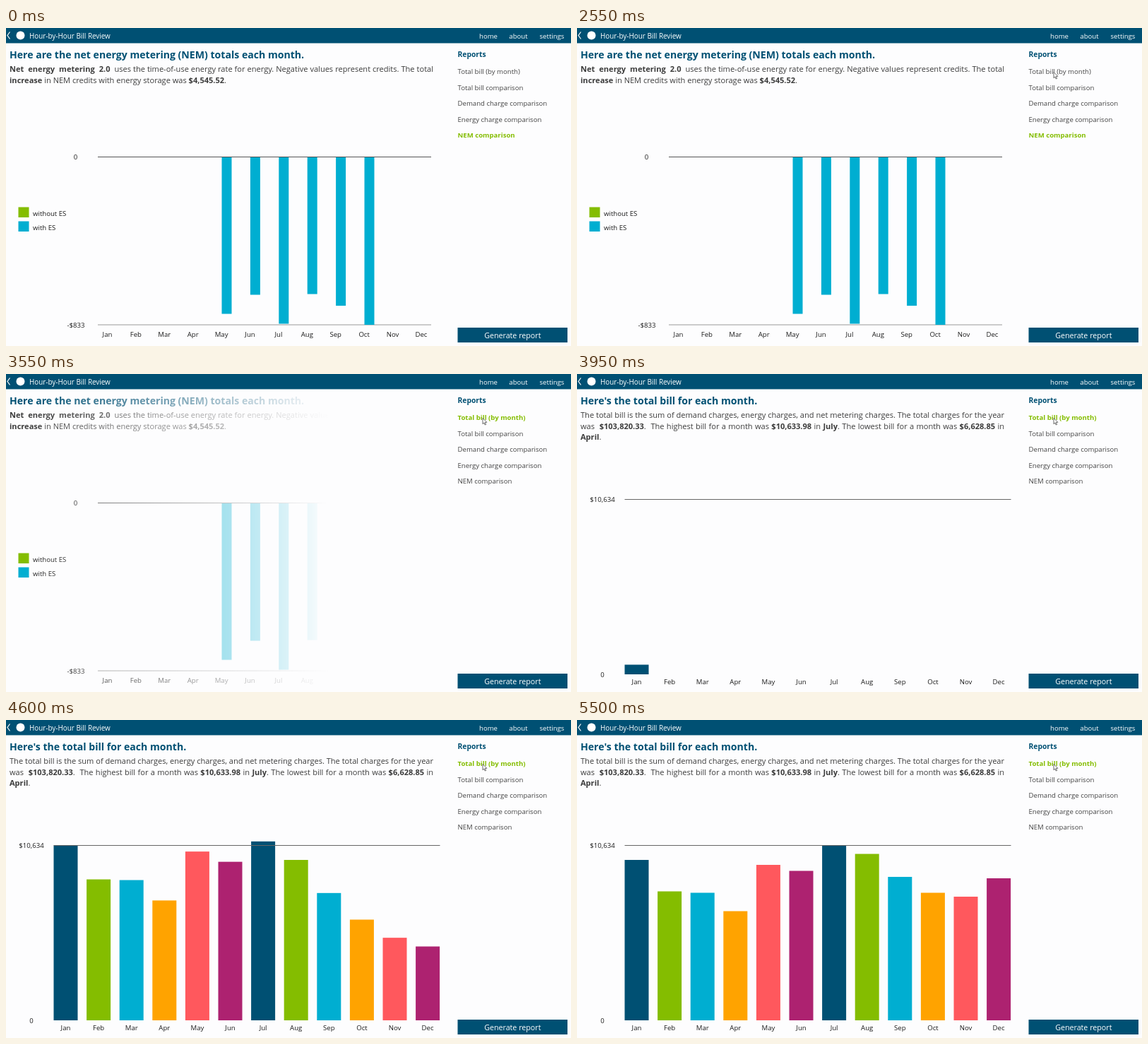
Animation of 800 by 450 pixels, one loop 8000 ms. Source, as an HTML page:

```html
<!DOCTYPE html>
<html lang="en">
<head>
<meta charset="utf-8">
<title>Monthly bill report</title>
<style>
  html, body { margin: 0; width: 100%; height: 100%; overflow: hidden; background: #fdfdfe; }
  #stage { position: relative; width: 800px; height: 450px; overflow: hidden; }
  #stage section, svg { position: absolute; left: 0; top: 0; width: 800px; height: 450px; }
  text { font: 500 9.6px "Open Sans", sans-serif; fill: #1c1c1c; }
  .heading { font-size: 14.1px; font-weight: 700; fill: #005073; }
  .mid { text-anchor: middle; }
  .light { fill: #fff; }
  .item { fill: #444; }
  .item.on { fill: #84bd00; font-weight: 700; }
  p { position: absolute; left: 5px; top: 50px; width: 600px; margin: 0;
      font: 11.05px/15.6px "Open Sans", sans-serif; color: #3c3c3c; white-space: nowrap; }
  p span { display: block; }
  .full { text-align: justify; text-align-last: justify; }
</style>
</head>
<body>
<div id="stage">
  <section id="nem">
    <svg id="nemChart"></svg>
    <p>
      <span class="full"><b>Net&nbsp; energy&nbsp; metering&nbsp; 2.0</b>&nbsp; uses the time-of-use energy rate for energy. Negative values represent credits. The total</span>
      <span><b>increase</b> in NEM credits with energy storage was <b>$4,545.52</b>.</span>
    </p>
  </section>
  <section id="bill">
    <svg id="billChart"></svg>
    <p>
      <span class="full">The total bill is the sum of demand charges, energy charges, and net metering charges. The total charges for the year</span>
      <span class="full">was&nbsp; <b>$103,820.33</b>.&nbsp; The highest bill for a month was <b>$10,633.98</b> in <b>July</b>. The lowest bill for a month was <b>$6,628.85</b> in</span>
      <span><b>April</b>.</span>
    </p>
  </section>
  <svg id="frame"></svg>
</div>
<script>
const LOOP = 8000, STEP = 50;
const CURSOR_SHOWN = 850, SELECT = 3100, SWITCH = 3950;
const NAVY = '#005073', GREEN = '#84bd00', CYAN = '#00aed1';
const COLORS = [NAVY, GREEN, CYAN, '#ffa300', '#ff585d', '#ad2270'];
const MONTHS = 'Jan Feb Mar Apr May Jun Jul Aug Sep Oct Nov Dec'.split(' ');
const BASE = 425;
const $ = id => document.getElementById(id);

function add(parent, tag, attrs, content = '') {
  const el = document.createElementNS('http://www.w3.org/2000/svg', tag);
  for (const name in attrs) el.setAttribute(name, attrs[name]);
  el.textContent = content;
  return parent.appendChild(el);
}
const label = (parent, x, y, content, cls = 'mid') => add(parent, 'text', { x, y, class: cls }, content);
const rect = (parent, x, y, width, height, fill) => add(parent, 'rect', { x, y, width, height, fill });

// Net metering chart
const nem = $('nemChart');
label(nem, 5, 43, 'Here are the net energy metering (NEM) totals each month.', 'heading');
label(nem, 98.5, 186, '0');
label(nem, 99, 424, '-$833');
MONTHS.forEach((month, i) => label(nem, 143.5 + 40.4 * i, 437, month));
rect(nem, 130, 419.5, 472, 1, '#999');
[404.5, 377.5, 418.5, 376.5, 393, 420].forEach((bottom, i) =>
  rect(nem, 305.5 + 40.4 * i, 182, 14, bottom - 182, CYAN));
rect(nem, 130, 182, 472, 1, '#555');
[['without ES', GREEN], ['with ES', CYAN]].forEach(([name, color], i) => {
  rect(nem, 17.5, 253.5 + 20 * i, 15, 14.5, color);
  label(nem, 38, 265.5 + 20.3 * i, name, '');
});

// Monthly bill chart
const bill = $('billChart');
label(bill, 5, 43, "Here's the total bill for each month.", 'heading');
label(bill, 36, 181, '$10,634');
label(bill, 36, 429, '0');
const bars = [227, 182.5, 180.5, 154.5, 220, 211.5, 248, 235.5, 203, 180.5, 175, 201].map((height, i) => {
  label(bill, 84.5 + 46.6 * i, 439, MONTHS[i]);
  return { height, el: rect(bill, 67.5 + 46.6 * i, BASE, 34, 0, COLORS[i % 6]) };
});
rect(bill, 67.5, 177, 547, 1, '#666');

// Header, menu, button and pointer
const frame = $('frame');
rect(frame, 0, 0, 800, 21.5, NAVY);
add(frame, 'path', { d: 'M5.5 5.5L2 10.5l3.5 5', fill: 'none', stroke: '#fff', 'stroke-width': 1.2 });
add(frame, 'circle', { cx: 20.5, cy: 10.5, r: 6, fill: '#fff' });
label(frame, 33, 14.5, 'Hour-by-Hour Bill Review', 'light').style.fontSize = '9.9px';
[['home', 683], ['about', 725.5], ['settings', 773]].forEach(([name, x]) =>
  label(frame, x, 14.5, name, 'mid light'));
label(frame, 639.5, 41.3, 'Reports', 'heading').style.fontSize = '10.3px';
const items = ['Total bill (by month)', 'Total bill comparison', 'Demand charge comparison',
  'Energy charge comparison', 'NEM comparison'].map((name, i) =>
  label(frame, 639.5, 65 + 22.5 * i, name, 'item'));
rect(frame, 639.5, 424, 155.5, 21, NAVY);
label(frame, 717.3, 439, 'Generate report', 'mid light').style.fontSize = '10.7px';
const pointer = add(frame, 'path', {
  d: 'M.5.5v8.2l1.9-1.7 1.3 3 1.4-.6-1.3-2.9 2.5-.2z',
  fill: '#fff', stroke: '#444', 'stroke-width': .8
});

// Pointer keys: time, x, y
const PATH = [[1150, 570, 96], [1600, 640, 69], [2000, 671, 121], [2100, 671, 124.5], [2550, 674.5, 62]];

// Smooth curve through the keys, at rest at both ends
function pointerAt(t, axis) {
  const last = PATH.length - 1;
  if (t <= PATH[0][0]) return PATH[0][axis];
  if (t >= PATH[last][0]) return PATH[last][axis];
  const slope = k => k === 0 || k === last ? 0
    : (PATH[k + 1][axis] - PATH[k - 1][axis]) / (PATH[k + 1][0] - PATH[k - 1][0]);
  const k = PATH.findIndex(key => key[0] > t) - 1;
  const a = PATH[k], b = PATH[k + 1], span = b[0] - a[0], u = (t - a[0]) / span, v = 1 - u;
  return a[axis] * (1 + 2 * u) * v * v + b[axis] * u * u * (3 - 2 * u)
    + span * u * v * (slope(k) * v - slope(k + 1) * u);
}

const clamp = v => Math.min(1, Math.max(0, v));
const easeOutBack = u => 1 + 2.70158 * (u - 1) ** 3 + 1.70158 * (u - 1) ** 2;

function render(t) {
  pointer.style.display = t < CURSOR_SHOWN ? 'none' : '';
  pointer.setAttribute('transform', `translate(${pointerAt(t, 1)} ${pointerAt(t, 2)})`);
  items[0].classList.toggle('on', t >= SELECT);
  items[4].classList.toggle('on', t < SELECT);

  // Soft wipe from right to left, then the new report appears at once
  $('nem').style.display = t < SWITCH ? '' : 'none';
  $('bill').style.display = t < SWITCH ? 'none' : '';
  const solid = 615 - 1045 * clamp((t - SELECT) / 800);
  const mask = `linear-gradient(to right, #000 ${solid}px, transparent ${solid + 430}px)`;
  $('nem').style.maskImage = $('nem').style.webkitMaskImage = t > SELECT ? mask : 'none';

  bars.forEach(({ height, el }, i) => {
    const start = Math.max(3937, 3900 + 51.5 * i);
    const h = Math.max(0, height * easeOutBack(clamp((t - start) / 1000)));
    el.setAttribute('y', BASE - h);
    el.setAttribute('height', h);
  });
}

function tick() {
  render(Math.floor(performance.now() % LOOP / STEP) * STEP);
  requestAnimationFrame(tick);
}
tick();
</script>
</body>
</html>
```
